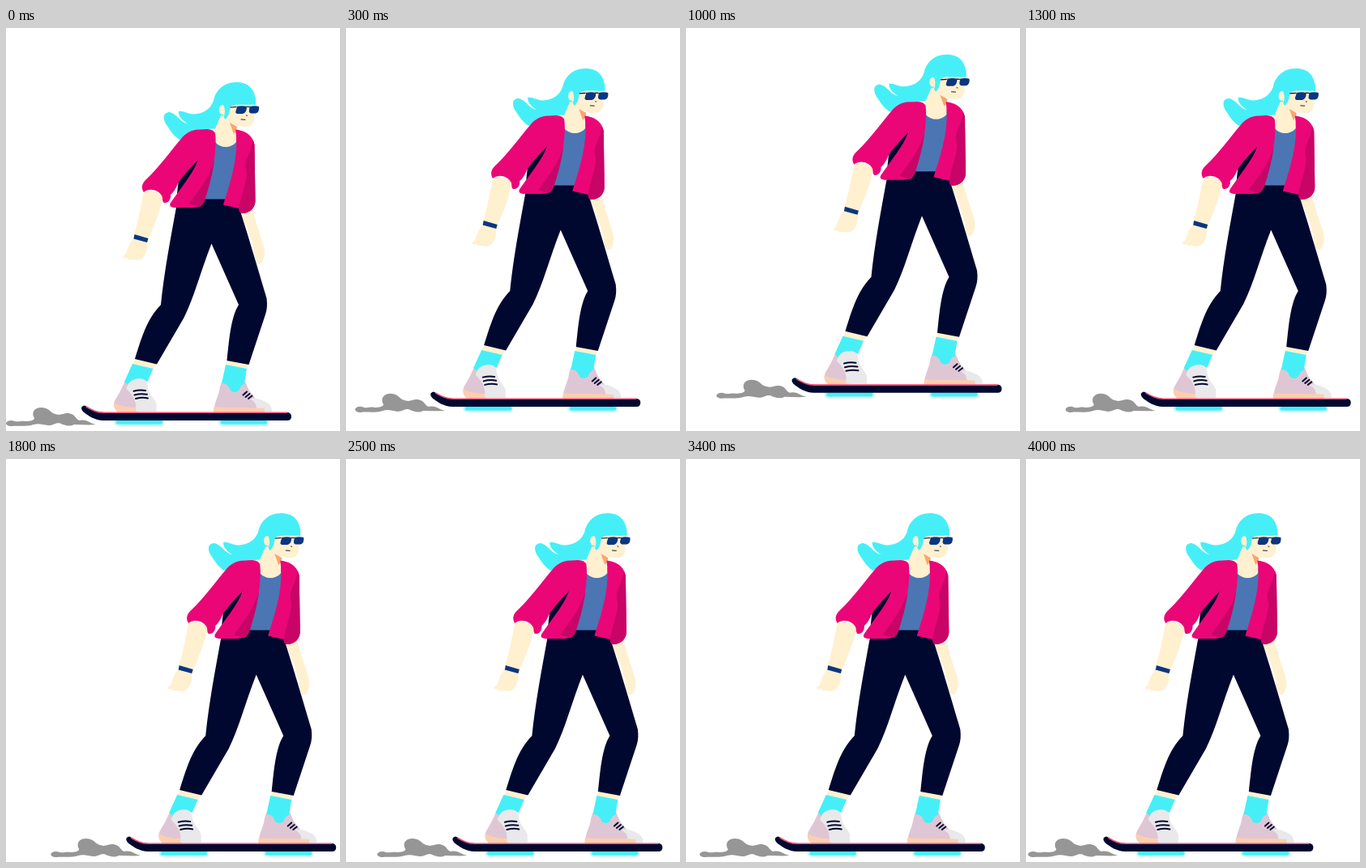
Animation, 412 px wide and 498 px high, one loop 4100 ms. Source, as an HTML page:

```html
<!DOCTYPE html>
<html lang="en">
<head>
<meta charset="utf-8">
<title>Hoverboard rider</title>
<style>
  html, body { margin: 0; width: 100%; height: 100%; overflow: hidden; background: #fff; }
  svg { display: block; width: 412px; height: 498px; }
  .skin { fill: #fff0d0; }
  .cyan { fill: #46eff7; }
  .navy { fill: #00082f; }
  .pink { fill: #ea0677; }
  .plum { fill: #c80567; }
  .mauve { fill: #dfc6d5; }
  .light { fill: #e9e8ea; }
  .sole { fill: #fbcfae; }
  .lens { fill: #0b3680; }
  .line { fill: none; stroke: #00082f; stroke-linecap: round; }
</style>
</head>
<body>
<svg viewBox="0 0 412 498" xmlns="http://www.w3.org/2000/svg">
  <defs>
    <filter id="soft" x="-10%" y="-80%" width="120%" height="260%"><feGaussianBlur stdDeviation="0.9"/></filter>
  </defs>
  <g id="rider">
    <!-- dust -->
    <path fill="#969696" d="M0 488C2 485 6 484 11 486C16 487 19 485 24 486C29 486 35 485 35 482C32 478 33 472 38 470C43 468 49 469 53 472C57 476 60 477 65 478C70 478 73 475 79 476.500C86 478 86 484 91 485C99 483 102 488 111 490C103 491 93 490 84 490C78 493 72 491 67 488.500C61 487 59 491 52 491C45 490 41 488 34 490C25 493 14 491 7 492C2 492 0 490 0 488Z"/>

    <!-- hair behind -->
    <path class="cyan" d="M308 95C309 77 300 67 284 67C267 67 258 79 256 90C252 101 242 106 232 106.500C225 107 219 102 213 103C212 108 218 115 224 118C215 117 211 106 202 104C193 104 193 113 199 121C203 128 208 134 214 138L236 126L264 124L284 100Z"/>

    <!-- far arm -->
    <path class="skin" d="M287 224L304 224C309 244 315 260 318 270C320 278 319 283 317 286C316 291 312 293 310 290C306 285 307 279 306 274C302 257 296 242 287 224Z"/>

    <!-- top and neck -->
    <path fill="#4b76b3" d="M256 138L287 134L284 214H243Z"/>
    <path class="skin" d="M265 108L257 127L258 141C265 149 277 149 284 141L284 129L280 126L284 110Z"/>
    <path fill="#f9a56f" d="M276 117L285 122L284 127L281 131Z"/>

    <!-- face -->
    <path class="skin" d="M270 92H306V109C307 117 302 122 296 122C288 122 281 120 276 116L268 108Z"/>
    <ellipse class="skin" cx="267" cy="101" rx="4.2" ry="6"/>
    <path class="cyan" d="M268 86H308V94.500C300 95.500 288 94 281 95L276.500 97.500C276 105 274 110 270.500 113L268.500 110C271 104 270 99 268 94Z"/>

    <!-- glasses -->
    <path class="line" stroke-width="1.2" d="M277 98L285 97.500M295 98Q298 96.500 301 98"/>
    <path class="lens" d="M285 97Q291 95.500 297 97Q297 105 292 106H285Q281 105 285 97Z"/>
    <path class="lens" d="M300.500 97Q307 95.500 312 97Q313 104 308 105.500H302Q298 104 300.500 97Z"/>
    <path fill="none" stroke="#fff0d0" stroke-width="1" d="M284.500 97.500L282.500 104M300 98L299 103"/>
    <path class="line" stroke-width=".9" d="M296.500 108L297.500 108.200M290 113L295 113.300"/>

    <!-- near forearm -->
    <path class="skin" d="M173 199L194 206C191 224 183 245 174.500 263C174 272 174 278 170 282C167 288 159 287 156 286C152 287 150 286 149.500 284C146 285 143.500 284 144.500 282C151 279 149 268 155.500 263C162 244 166 223 169 207Z"/>
    <path class="lens" d="M158.500 255L175.500 260L174 265L157.500 260.500Z"/>

    <!-- near foot -->
    <path class="mauve" d="M147 435L155 444L166 474H138C133 471 132 465 134.500 460C138 454 144 444 147 435Z"/>
    <path class="sole" d="M133.500 463C140 467 151 469 162 469V475H138Q132 470 133.500 463Z"/>
    <path class="skin" d="M160 407L186 414L181 422L156 417Z"/>
    <path class="cyan" d="M156 415L181.500 421L174.500 437C168 434 161 436 157 443Q154 446 150.500 443Q149.500 439 146 437Z"/>
    <path class="light" d="M148.500 446C150 439 154 434.500 161 433.500C168 432.500 173.500 434 174.500 441C175 452 183 457 185.500 464V474H160C161 463 159 456 148.500 446Z"/>
    <path class="line" stroke-width="2" d="M157.500 448.700Q165 446.800 172 448M158.500 453.500Q166 451.300 174 452.800M160 458Q168 456 175 457.500"/>

    <!-- far foot -->
    <path class="mauve" d="M267 437L295 437C298 443 299 448 304 453L320 474H257C256 465 261 457 263 449C264 443 265 438 267 437Z"/>
    <path class="light" d="M300 458C306 456.500 311 458 317 460.500C325 463.500 328 467 328 474H308C310 468 309 462 300 458Z"/>
    <path class="sole" d="M256.500 468C273 470 299 468 319 470V475H256Z"/>
    <path class="skin" d="M273 408L299.500 414L297.500 421L271.500 417Z"/>
    <path class="cyan" d="M271 416L297 421L294 440C291 440 289 444 287 448Q282 452 277 448C275 443 273 439 266 439Z"/>
    <path class="line" stroke-width="2" d="M292.500 453.500L297 449.500M295.500 456L300.500 452M299 458L303.500 454.500"/>

    <!-- trousers -->
    <path class="navy" d="M211 216L246 211.500H277L287 220C297 251 308 288 321.500 334C322.500 342 322 348 320 354L299.500 416L272.500 411C275 388 277 358 287 342L253.500 266.500C240 301 232 333 219.500 358L186 415.500L159 409C166 387 173 360 191 342C195 302 203 260 211 216Z"/>
    <path class="navy" d="M238 160L213 186L211 205L226 196Z"/>

    <!-- jacket -->
    <path class="pink" d="M258 130C255 124 247 125 238 125.500C228 126 221 130 215 138C203 152 189 172 174 186C168 191 166 197 170 203C176 197 188 200 192 207C194 210 192 214 195 216C200 217 204 211 203 206C206 204 210 198 212 192C218 183 229 171 237 163C229 183 215 198 203 216C201 220 203 221 207 222H227C238 222 242 220 245 213C253 190 261 151 258 130Z"/>
    <path class="plum" d="M257 163C252 183 237 202 226 217L239 221Q243 219 245 213C250 198 255 180 257 163Z"/>
    <path class="pink" d="M283 125.500C293 126.500 304 131 306.500 144L307.500 211C308.500 222 301 229 291 229Q287 228 287.500 223L268 218.500C277 190 288 157 283 125.500Z"/>
    <path class="plum" d="M304.500 138C303 152 296 160 295.500 168C295 174 298 178 296.500 184C295 197 289 209 287.500 223Q287 228 291 229C301 229 308.500 222 307.500 211L306.500 144Z"/>

    <!-- board -->
    <g class="cyan">
      <g opacity=".55" filter="url(#soft)"><rect x="134" y="483" width="60" height="8" rx="3"/><rect x="263" y="483" width="60" height="8" rx="3"/></g>
      <rect x="136" y="485" width="57" height="4.500" rx="2.200"/>
      <rect x="265" y="485" width="57" height="4.500" rx="2.200"/>
    </g>
    <path class="navy" d="M98 467C105 471 111 475 121 475H348Q352 476 352 480Q352 485 347 485H120C110 485 101 479 95 474Q91 469 95 467Q97 466 98 467Z"/>
    <path fill="none" stroke="#f5507c" stroke-width="1.600" d="M99 468C106 472 112 475.300 121 475.300H347"/>
  </g>
</svg>
<script>
  const LOOP = 4100, TICK = 100, TURN = 1600, REACH = 60, RISE = 45.6;
  const rider = document.getElementById("rider");

  function draw(ms) {
    const t = Math.floor(ms / TICK) * TICK % LOOP;
    const x = REACH * (t < TURN ? t / TURN : (LOOP - t) / (LOOP - TURN));
    const y = -RISE * Math.max(0, 1 - Math.abs(t / (TURN / 2) - 1));
    rider.setAttribute("transform", `translate(${x.toFixed(2)} ${y.toFixed(2)})`);
  }

  const start = performance.now();
  function frame() {
    draw(performance.now() - start);
    requestAnimationFrame(frame);
  }
  draw(0);
  requestAnimationFrame(frame);
</script>
</body>
</html>
```
